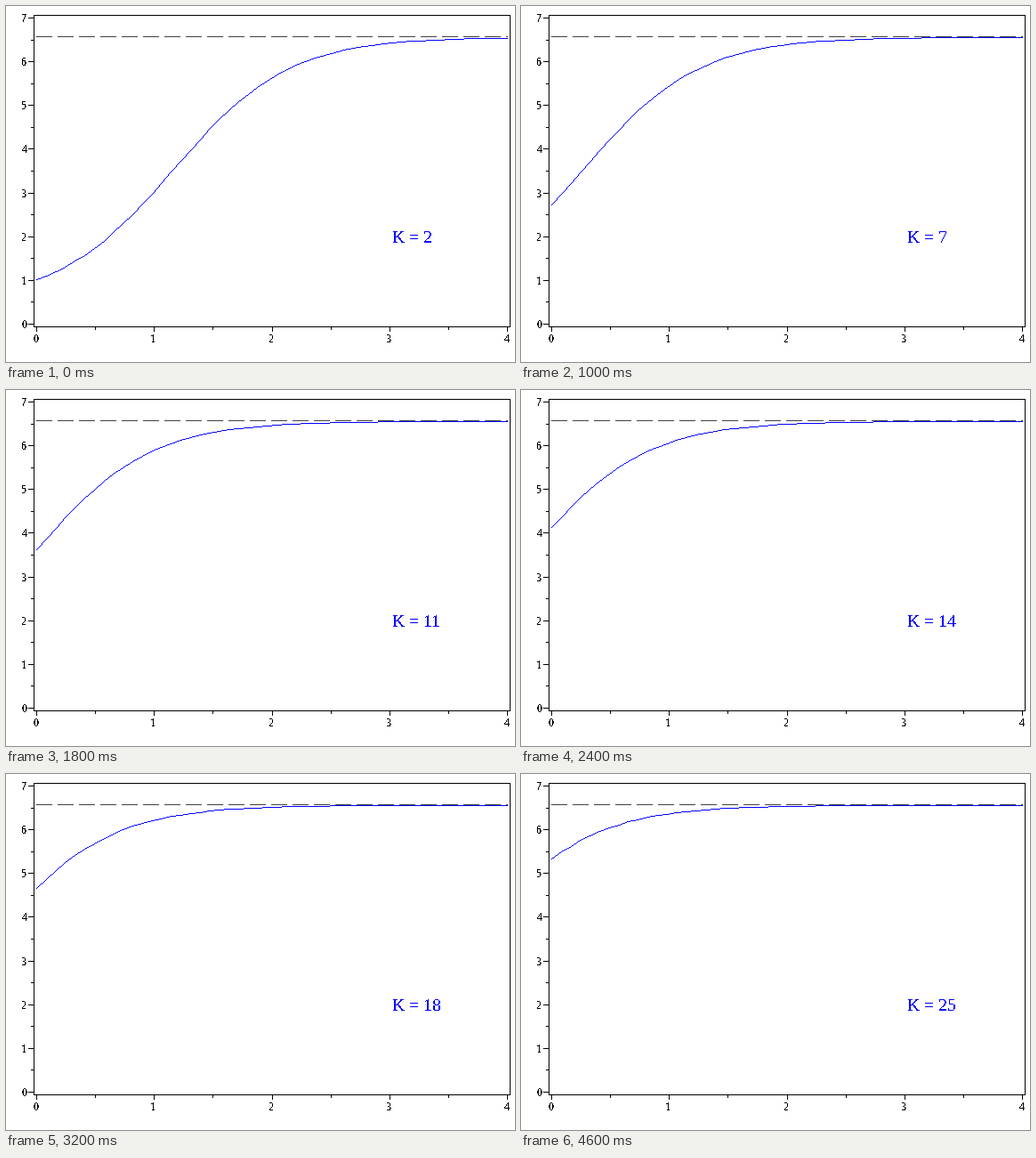
A matplotlib script that plays this animation: 572x400 px, repeating every 4.8 s.

```python
import numpy as np
import matplotlib.pyplot as plt
from matplotlib.animation import FuncAnimation

W, H, DPI = 572, 400, 100
PX = 72 / DPI  # one pixel in points
FONT = "Liberation Serif"
BLUE = "#0000ff"

LIMIT, FLOOR, RATE = 50, 0.9, 2.04
K_START, K_END = 2, 25

plt.rcParams["text.hinting"] = "native"
plt.rcParams["text.hinting_factor"] = 1

fig = plt.figure(figsize=(W / DPI, H / DPI), dpi=DPI, facecolor="white")
ax = fig.add_axes([0, 0, 1, 1])
ax.set(xlim=(0, W), ylim=(H, 0))
ax.axis("off")


def to_x(t):
    return np.floor(34.5 + 132.25 * t)


def to_y(v):
    return np.floor(357.5 - 49.14 * v)


def line(xs, ys):
    """Black straight lines through whole pixels."""
    ax.plot(xs, ys, color="black", lw=PX, antialiased=False, snap=True,
            solid_capstyle="butt", solid_joinstyle="miter")


def dots(xs, ys, color):
    """Single pixels."""
    return ax.plot(xs, ys, ls="none", marker=",", color=color,
                   antialiased=False)[0]


def label(x, y, s, size, **kw):
    return ax.text(x, y, s, fontsize=size * PX, family=FONT,
                   va="baseline", antialiased=False, **kw)


def trace(xs, ys):
    """Pixels of a thin polyline, one per step along its longer axis."""
    px, py = [xs[:1]], [ys[:1]]
    for x0, y0, x1, y1 in zip(xs, ys, xs[1:], ys[1:]):
        n = int(max(abs(x1 - x0), abs(y1 - y0)))
        s = np.arange(1, n + 1) / max(n, 1)
        px.append(np.floor(x0 + (x1 - x0) * s + 0.5))
        py.append(np.floor(y0 + (y1 - y0) * s + 0.5))
    return np.concatenate(px), np.concatenate(py)


def growth(k, t):
    """Saturating response to a quantity that grows from k to LIMIT."""
    odds = (k - FLOOR) / (LIMIT - k) * np.exp(RATE * t)
    x = (FLOOR + LIMIT * odds) / (1 + odds)
    return 8.5 * x / (15 + x)


# Frame and ticks
line([31, 566, 566, 31, 31], [10, 10, 360, 360, 10])
for i in range(9):
    x, major = to_x(i / 2), i % 2 == 0
    line([x, x], [360, 365 if major else 363])
    if major:
        label(x - 0.5, 378, str(i // 2), 13, ha="center")
for i in range(15):
    y, major = to_y(i / 2), i % 2 == 0
    line([25 if major else 28, 31], [y, y])
    if major:
        label(20.5, y + 5, str(i // 2), 13, ha="center")

# Upper bound, 18 pixels on and 6 off
xs = np.arange(34, 564)
xs = xs[(xs - 34) % 24 < 18]
dots(xs, np.full(len(xs), to_y(6.55)), "#404040")

t = np.linspace(0, 4, 50)
curve = dots([], [], BLUE)
caption = label(433.5, 266, "", 20, color=BLUE)


def update(i):
    k = K_START + i
    curve.set_data(*trace(to_x(t), to_y(growth(k, t))))
    caption.set_text(f"K = {k}")
    return curve, caption


anim = FuncAnimation(fig, update, frames=K_END - K_START + 1, interval=200,
                     repeat=True, repeat_delay=0)
plt.show()
```
